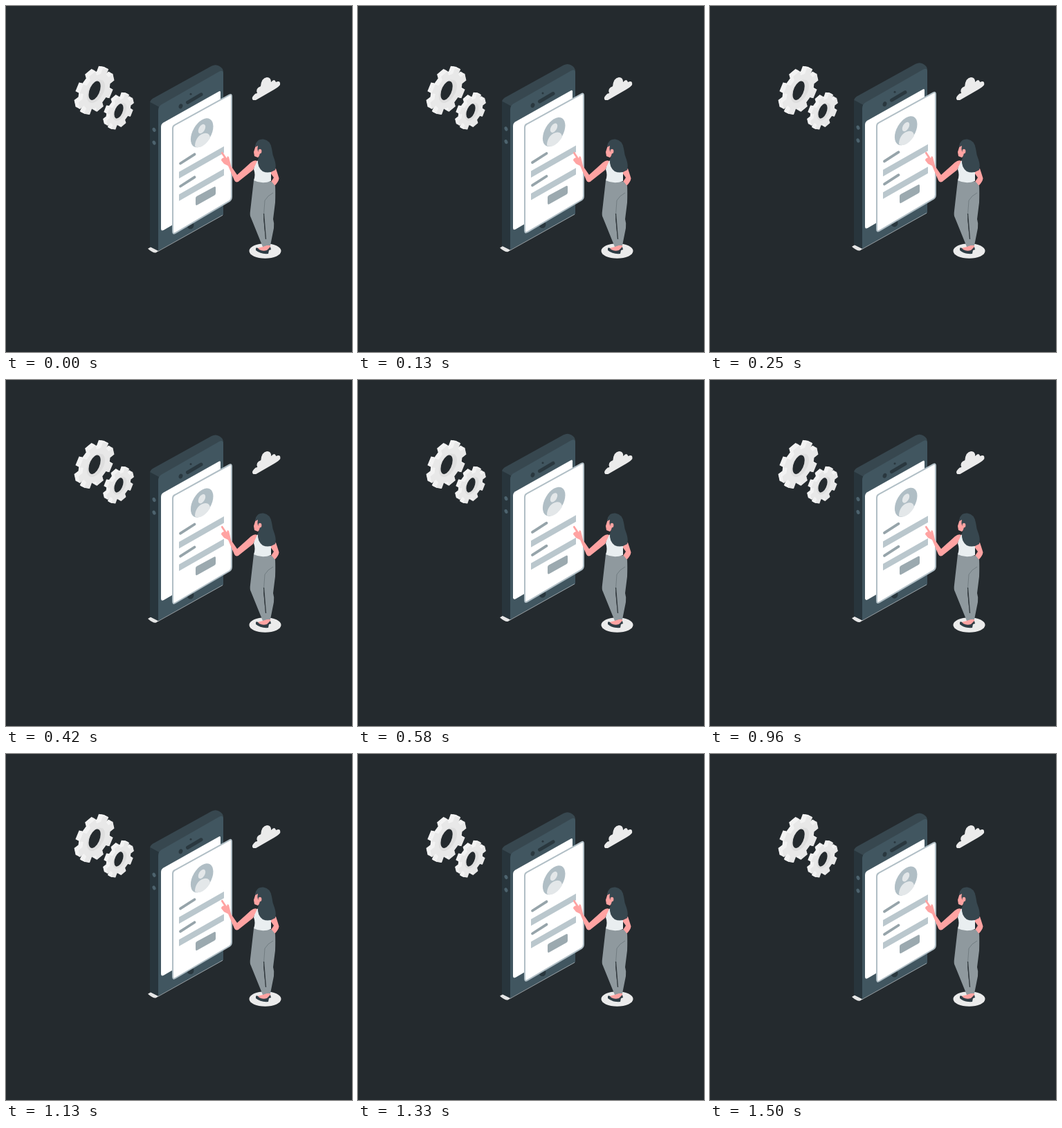
Animation, 500 px wide and 500 px high, one loop 1540 ms. Source, as an HTML page:

```html
<!DOCTYPE html>
<html lang="en">
<head>
<meta charset="utf-8">
<title>Profile form on a phone</title>
<style>
  html, body { margin: 0; width: 100%; height: 100%; overflow: hidden; background: #242a2e; }
  svg { display: block; width: 100vw; height: 100vh; }
  .skin { fill: #ffa3a2; }
</style>
</head>
<body>
<svg viewBox="0 0 500 500">
  <g id="gears"></g>

  <path id="cloud" fill="#ebebeb" d="M357 136Q354 133 358 129Q360 126 363 126Q360 119 368 116Q369 104 377 103Q383 103 383 110Q388 104 390 110Q397 107 396 114Q394 117 387 121L361 136Z"/>

  <g id="phone">
    <path fill="#e6e6e6" d="M205 351L210 348L221 354L217 356.500Q213 358 205 351Z"/>
    <path fill="#37474f" d="M208 140Q208 137 212 134L297 87Q303 84 308 87Q314 90 314 96L314 302L220 354L208 348Z"/>
    <path fill="#28353c" d="M208 139L221 146L220 354L208 348Z"/>
    <path fill="#415660" d="M220 151Q220 146 224 143L308 95Q314 92 314 98L314 302L220 354Z"/>
    <path fill="none" stroke="#dfe5e8" stroke-width=".6" d="M220 354.500L313 302.500"/>
    <g fill="#4d636e">
      <ellipse cx="214" cy="179" rx="2.300" ry="3.200" transform="rotate(-25 214 179)"/>
      <ellipse cx="214" cy="197.700" rx="2.300" ry="3.200" transform="rotate(-25 214 197.700)"/>
    </g>
    <g fill="#2a383f">
      <ellipse cx="252.500" cy="145" rx="2.800" ry="3.600" transform="rotate(20 252.500 145)"/>
      <circle cx="267" cy="127.500" r="1.500"/>
      <ellipse cx="266.500" cy="317" rx="5" ry="5.500"/>
      <path stroke="#2a383f" stroke-width="5" stroke-linecap="round" d="M262.500 139.500L282 128"/>
    </g>
    <path fill="#fff" d="M224 175Q224 171 227 169L308 123.500Q310 122.500 310 125L310 276L228 324Q224 326 224 322Z"/>

    <path fill="#fff" stroke="#b0bec5" stroke-width="2" d="M241 177Q241 173.500 244 172L323 128.500Q326 127 326 130.500L326 276Q326 280 323 282L245 328Q241 330.500 241 326Z"/>
    <circle r="18.800" fill="#b0bec5" transform="matrix(.866 -.5 0 1 283.200 183.500)"/>
    <circle r="6" fill="#e3e7e9" transform="matrix(.866 -.5 0 1 283 177.700)"/>
    <path fill="#e3e7e9" d="M273 203C273 194 278 187 284 185C291 182 295 186 295 191Q289 201 281 204Q275 205 273 203Z"/>
    <path fill="#bac7cd" d="M250 240L315 203V212.500L250 249.500ZM250 272.500L315 235.500V245L250 282Z"/>
    <path fill="none" stroke="#96a4aa" stroke-width="3.800" stroke-linecap="round" d="M252 227.700L272.500 214.500M252 260.700L272.500 247.500"/>
    <path fill="#9ba9af" d="M274 278Q274 276 276 275L301 261.500Q303 260.500 303 263V271Q303 273 301 274L276 288Q274 289 274 286Z"/>
  </g>

  <ellipse cx="374.500" cy="354" rx="23" ry="10.800" fill="#ebebeb"/>
  <g id="woman">
    <path class="skin" d="M381 234L390 235L392 241L394.500 249Q394 254 388 260L383 254L387 248L382 241Z"/>
    <path class="skin" d="M371 344L382 342L382 349L379 355L367 354L363 350L371 348Z"/>
    <path fill="#2e3d45" d="M361 350Q363 348 366 352Q371 355 377 353L382 348L383 352L380 353L379 358Q368 359 361 353Z"/>
    <path fill="#8f999e" d="M358 252L384 254L389 260Q389.500 270 389 284L386 308Q388 314 387 321L382 346L376 346L375 337L373.500 310L372 302L372.500 311L375 337L377 346L371 348L354 306Q352 303 353 296Z"/>
    <path fill="none" stroke="#727d82" d="M386 270Q378 274 374 281L372.500 302"/>
    <path fill="none" stroke="#343c40" stroke-width="1.300" d="M372.500 300L375.500 337"/>
    <path fill="#e9eef0" d="M360 225L365 223L381 233L383 241L383 253Q370 258 358 252Q361 244 358 236Z"/>
    <path class="skin" d="M363 224Q359 222 354 226L334 244L325 231Q324 226 322 218L320 217L319 220L313 211Q311 210 311 213L315 219Q311 220 311 223L315 228L321 231L330 252Q333 257 338 252L357 237Z"/>
    <path class="skin" d="M362 198L358 211L359 217L364 219L369 214L371 203Z"/>
    <path fill="#37474f" d="M360 204Q361 192 372 192.500Q382 194 384 206Q385 215 388 222Q391 231 389 237Q380 243 371 239Q363 233 364 222L367 213Q362 210 364 202Z"/>
    <ellipse class="skin" cx="367" cy="210" rx="2.400" ry="3.300"/>
  </g>
</svg>
<script>
const LOOP = 1540, LIFT = 8.4, LEAD = 50;
const byId = id => document.getElementById(id);

// Eight-toothed wheel outline, drawn flat and tilted by the isometric matrix
function wheel(radius, phase) {
  const profile = [[-.23, .77], [-.19, 1], [.19, 1], [.23, .77]];
  const points = [];
  for (let tooth = 0; tooth < 8; tooth++) {
    for (const [offset, size] of profile) {
      const a = phase + tooth * Math.PI / 4 + offset;
      points.push([Math.cos(a) * radius * size, Math.sin(a) * radius * size]);
    }
  }
  return 'M' + points.map(p => p.map(n => n.toFixed(2)).join(' ')).join('L') + 'Z';
}

function gear(x, y, radius, depth, phase) {
  const outline = wheel(radius, phase);
  const place = (k, width = .866) => `transform="matrix(${width} -.5 0 1 ${x - k} ${y - k * .55})"`;
  let out = '';
  for (let k = depth; k > 0; k -= .5) {
    out += `<path d="${outline}" fill="#f3f3f3" ${place(k)}/>`;
  }
  return out + `<path d="${outline}" fill="#e8e8e8" ${place(0)}/>
    <circle r="${radius * .5}" fill="#dedede" ${place(.5)}/>
    <circle r="${radius * .41}" fill="#242a2e" ${place(depth * .4, .7)}/>`;
}

byId('gears').innerHTML = gear(130.5, 123.5, 30, 6, -.22) + gear(165, 153, 23, 5, -.25);

function draw(now) {
  const angle = (now % LOOP + LEAD) / LOOP * Math.PI;
  const lift = Math.abs(Math.sin(angle)) ** 1.7;
  byId('phone').setAttribute('transform', `translate(0 ${-LIFT * lift})`);
  byId('cloud').setAttribute('transform', `translate(${lift * .4} 0)`);
  requestAnimationFrame(draw);
}
draw(performance.now());
</script>
</body>
</html>
```
